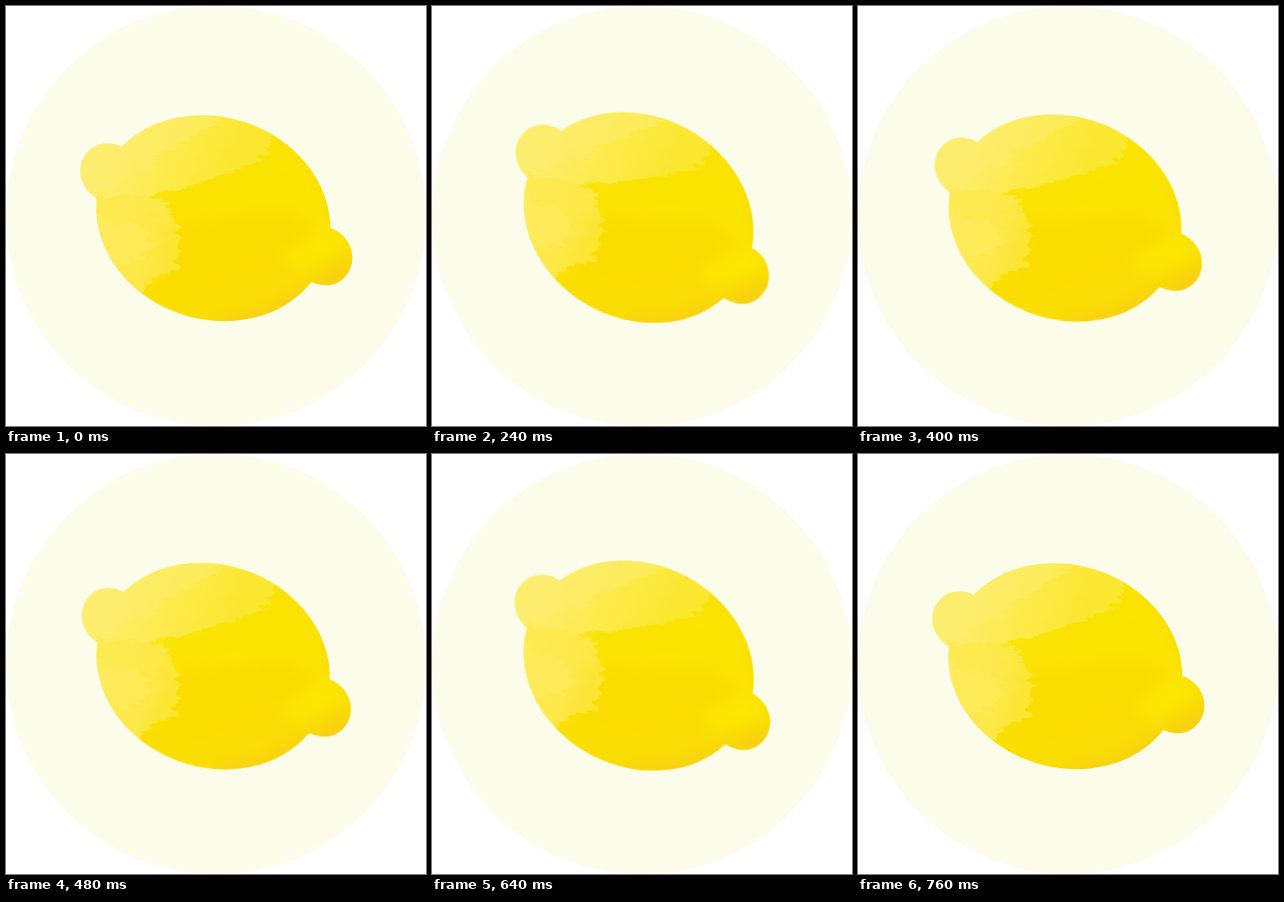
Recreate the animation shown at these times as an HTML page. Size 420 px wide and 420 px high, loop 1 s.

```html
<!DOCTYPE html>
<html lang="en">
<head>
<meta charset="utf-8">
<title>Wobbling lemon</title>
<style>
  html, body { margin: 0; width: 100%; height: 100%; overflow: hidden; background: #fff; }
  svg { display: block; width: 100vw; height: 100vh; }

  .lemon {
    transform-origin: 210.3px 208.3px;
    animation: wobble 1s step-end infinite;
  }

  /* two wobbles: eased swing out, even swing back */
  @keyframes wobble {
    0%, 44%, 76%, 100% { transform: rotate(0deg); }
    16%, 48% { transform: rotate(1.8deg); }
    20%, 52% { transform: rotate(6deg); }
    24%, 56% { transform: rotate(10.2deg); }
    28%, 60% { transform: rotate(12deg); }
    32%, 64% { transform: rotate(9.1deg); }
    36%, 68% { transform: rotate(6.1deg); }
    40%, 72% { transform: rotate(3deg); }
  }
</style>
</head>
<body>
<svg viewBox="0 0 420 420">
  <defs>
    <clipPath id="shape">
      <ellipse cx="207.2" cy="212.2" rx="118.6" ry="101.2" transform="rotate(18.2 207.2 212.2)"/>
      <ellipse cx="103.6" cy="166.7" rx="30.4" ry="28.4" transform="rotate(45 103.6 166.7)"/>
      <ellipse cx="317" cy="249.9" rx="30.4" ry="28.4" transform="rotate(45 317 249.9)"/>
    </clipPath>

    <linearGradient id="skin" gradientUnits="userSpaceOnUse" x1="130" y1="120" x2="270" y2="310">
      <stop offset="0" stop-color="#fbe62c"/>
      <stop offset=".35" stop-color="#fae405"/>
      <stop offset=".62" stop-color="#fade00"/>
      <stop offset="1" stop-color="#fadb08"/>
    </linearGradient>
    <linearGradient id="top" gradientUnits="userSpaceOnUse" x1="100" y1="140" x2="225" y2="175">
      <stop offset="0" stop-color="#fdee6e"/>
      <stop offset=".5" stop-color="#fcea4c"/>
      <stop offset="1" stop-color="#fbe730"/>
    </linearGradient>
    <linearGradient id="side" gradientUnits="userSpaceOnUse" x1="95" y1="215" x2="172" y2="235">
      <stop offset="0" stop-color="#fcea52"/>
      <stop offset=".6" stop-color="#fce848"/>
      <stop offset="1" stop-color="#fbe632"/>
    </linearGradient>

    <!-- ragged watercolour edges -->
    <filter id="rough" filterUnits="userSpaceOnUse" x="40" y="80" width="340" height="260"
            color-interpolation-filters="sRGB">
      <feTurbulence type="fractalNoise" baseFrequency=".06 .17" numOctaves="4" seed="8"/>
      <feDisplacementMap in="SourceGraphic" scale="20" xChannelSelector="R" yChannelSelector="G"/>
      <feGaussianBlur stdDeviation=".6"/>
    </filter>
    <filter id="soft" filterUnits="userSpaceOnUse" x="40" y="80" width="340" height="260">
      <feGaussianBlur stdDeviation="7"/>
    </filter>
  </defs>

  <circle cx="210" cy="210" r="210" fill="#fbfdea"/>

  <g class="lemon">
    <g clip-path="url(#shape)">
      <rect x="60" y="90" width="300" height="240" fill="url(#skin)"/>

      <g filter="url(#soft)">
        <path d="M235 160 L300 150 330 225 290 210 180 215Z" fill="#fae500" opacity=".7"/>
        <path d="M175 215 L285 205 300 235 200 285 160 270Z" fill="#fadc00" opacity=".7"/>
        <path d="M275 252 L315 222 350 230 330 247 295 266Z" fill="#fae600"/>
        <path d="M318 270 L350 250 345 290 300 288Z" fill="#f9d00e"/>
        <path d="M205 315 L260 303 305 278 310 300 240 330Z" fill="#facf14"/>
      </g>

      <g filter="url(#rough)">
        <path d="M50 120 L110 90 230 90 268 124 263 146 239 161 209 171 179 179 144 191 50 214Z"
              fill="url(#top)"/>
        <path d="M50 120 L110 90 195 90 216 112 186 132 158 148 142 160 112 178 50 200Z"
              fill="#fdee70" opacity=".5"/>
        <path d="M70 192 L146 188 160 200 170 214 173 236 172 260 150 272 136 286 100 294 70 250Z"
              fill="url(#side)"/>
        <path d="M80 212 L116 216 142 226 146 240 130 256 104 264 80 242Z"
              fill="#fdec6a" opacity=".4"/>
      </g>
    </g>
  </g>
</svg>
</body>
</html>
```
